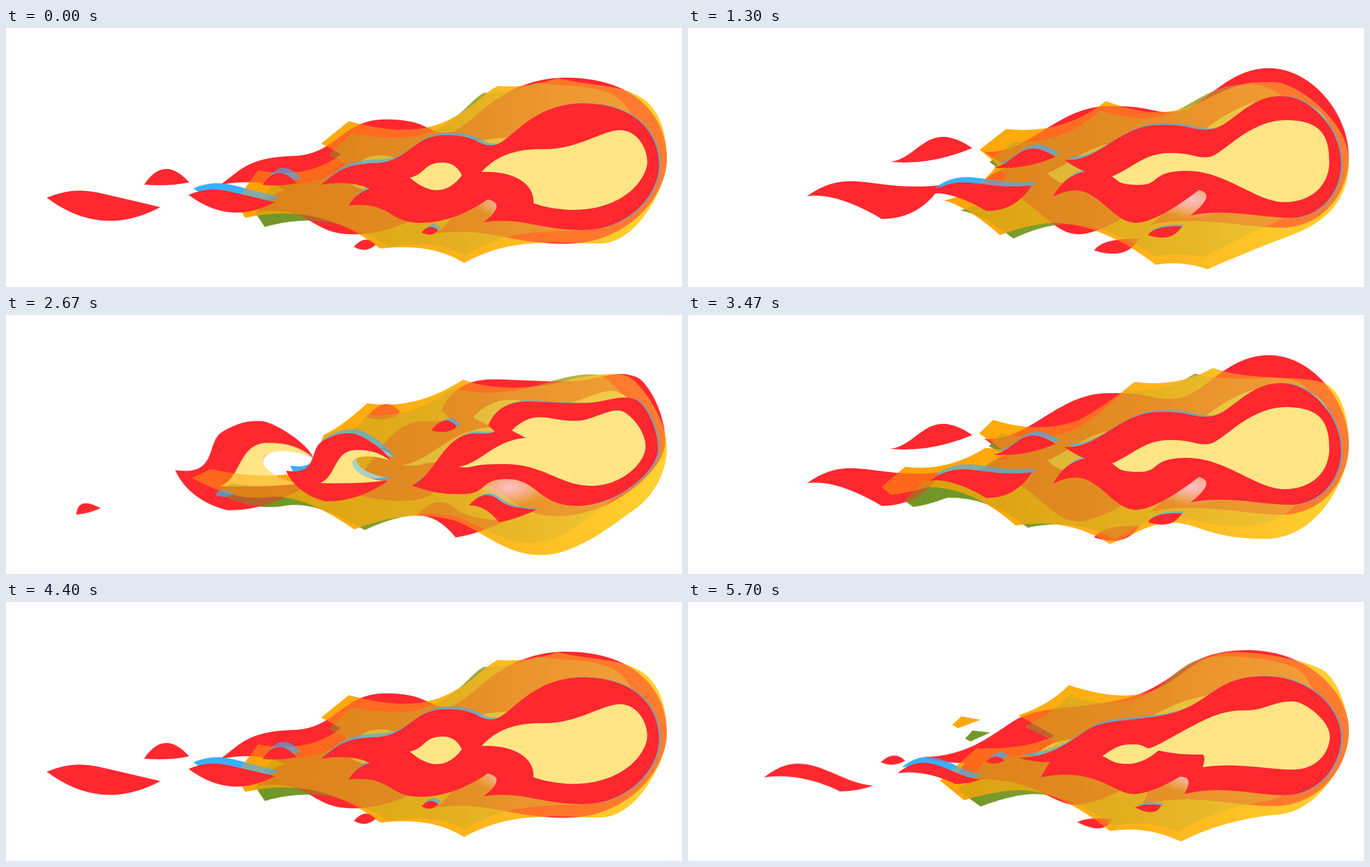
An HTML page without scripts that plays this animation: 1207 by 464 pixels, repeating every 5.73 s.

```html
<!DOCTYPE html>
<html lang="en">
<head>
<meta charset="utf-8">
<title>Fireball</title>
<style>
html, body { margin: 0; width: 100%; height: 100%; overflow: hidden; background: #fff; }
svg { display: block; width: 100%; height: 100%; }
/* Poses are stacked 1000 units apart; each layer rolls one pose every 80 ms. */
.roll { animation: roll 5.73s steps(71) infinite; }
@keyframes roll {
  0%, .35% { transform: translateY(0); }
  99.48%, 100% { transform: translateY(-71000px); }
}
.red { fill: #ff282e; --core: #ffe585; }
.blue { fill: #3aafff; --core: #3aafff; }
.core { fill: var(--core); }
.amber { fill: url(#amber); }
.olive { fill: url(#olive); }
.half { fill-opacity: .5; }
.most { fill-opacity: .63; --core: #bfeedd; }
</style>
</head>
<body>
<svg viewBox="0 0 1207 464">
<defs>
  <linearGradient id="amber" gradientUnits="userSpaceOnUse" x1="450" y1="0" x2="1180" y2="0">
    <stop offset="0" stop-color="#ffa506"/>
    <stop offset=".5" stop-color="#ffb31a"/>
    <stop offset="1" stop-color="#ffd333"/>
  </linearGradient>
  <linearGradient id="olive" gradientUnits="userSpaceOnUse" x1="450" y1="0" x2="1150" y2="0">
    <stop offset="0" stop-color="#719628"/>
    <stop offset=".5" stop-color="#8fa634"/>
    <stop offset="1" stop-color="#c8b650"/>
  </linearGradient>
  <radialGradient id="glow">
    <stop offset="0" stop-color="#ffc4d2" stop-opacity=".95"/>
    <stop offset=".45" stop-color="#ffc0c8" stop-opacity=".6"/>
    <stop offset="1" stop-color="#ffd0a0" stop-opacity="0"/>
  </radialGradient>

  <!-- Heads and parts shared by several poses -->
  <g id="forked">
    <path d="M724 306C770 285 780 213 838 212Q862 214 873 209L861 198C870 175 890 155 930 155S1030 162 1065 154S1110 146 1125 152S1164 200 1164 240S1090 342 1020 342S950 294 895 294S865 321 810 321S740 308 724 306Z"/>
    <path class="core" d="M808 272C850 265 870 225 928 220L903 207C920 190 935 183 955 183S1010 196 1040 186S1080 170 1095 171S1142 205 1142 235S1100 306 1045 306S960 267 890 267S840 276 808 272Z"/>
  </g>
  <g id="round">
    <path d="M672 236C730 242 770 176 836 174S900 186 935 181S1000 122 1058 122S1166 185 1166 242S1125 340 1075 340S960 322 897 336Q945 298 912 290S840 349 800 349S735 290 690 291Q675 291 652 302Q672 264 709 257Q690 250 672 236Z"/>
    <path class="core" d="M757 266C795 250 815 224 860 224S905 234 930 231S1000 165 1068 165S1145 200 1145 240S1115 312 1065 312S960 256 892 256S845 281 806 281S770 274 757 266Z"/>
  </g>
  <g id="long">
    <path d="M590 279C650 278 680 250 715 228S830 215 885 192S950 133 1030 133S1166 190 1166 242S1125 346 1065 346S960 327 886 344Q905 312 878 313S830 344 795 344S730 295 630 314Q636 302 646 287Q620 288 590 279Z"/>
    <path class="core" d="M740 276C760 262 770 255 793 255S812 260 822 262S905 215 945 202S1000 198 1025 190S1060 178 1080 178S1146 212 1146 240S1125 298 1085 300S980 286 919 296Q925 278 919 273Q880 275 840 266S815 290 786 290S755 282 740 276Z"/>
  </g>
  <g id="crescent">
    <path d="M500 279C560 288 540 240 565 226S600 212 616 212S680 242 687 262C650 246 620 252 619 267S650 296 682 297Q630 334 572 334S520 325 500 279Z"/>
    <path class="core" d="M561 301C590 290 585 245 622 242Q660 240 686 261C650 248 618 252 619 267S650 296 676 297Q625 303 561 301Z"/>
  </g>
  <path id="eye" class="core" d="M583 290Q608 253 655 253T730 284Q700 329 655 329L619 320Q642 305 615 305Q588 304 583 290Z"/>
  <g id="island">
    <path d="M400 318Q480 222 570 218T700 285Q640 372 570 372T400 318Z"/>
    <use href="#eye" x="-85"/>
  </g>

  <!-- Flame, 9 poses -->
  <g id="flame">
    <g>
      <path d="M562 281C590 260 600 244 660 242S725 192 785 192S840 212 870 210S935 135 1030 135S1166 190 1166 245S1110 362 1030 362S925 338 853 348Q895 315 860 307S805 349 742 349S690 310 612 318Q622 298 649 288Q615 272 562 281Z"/>
      <path d="M326 299Q360 284 395 292T480 312Q400 355 326 299Z"/>
      <path d="M458 281Q485 240 519 278Q490 284 458 281Z"/>
      <path d="M742 366Q758 348 772 363Q758 376 742 366Z"/>
      <path class="core" d="M721 268C750 262 745 241 780 241Q803 241 814 264Q775 315 721 268Z"/>
      <path class="core" d="M849 258C870 235 900 216 960 217S1065 183 1096 183S1145 215 1145 240S1110 326 1010 326Q970 324 942 314C944 275 900 255 849 258Z"/>
    </g>
    <g transform="translate(0 1000)">
      <path d="M514 286Q570 212 690 212C730 212 705 246 735 254S770 217 840 214Q808 208 778 193C880 200 920 131 1030 131S1166 190 1166 242S1110 353 1050 353S950 328 918 330S880 365 828 352Q856 322 830 314Q790 304 746 318S760 376 640 376S545 330 457 315Q490 317 548 314Q542 300 514 286Z"/>
      <path d="M277 325Q305 280 334 325Q300 324 288 354Z"/>
      <path d="M377 273Q400 270 421 267L430 277Q410 300 377 273Z"/>
      <use href="#eye"/>
      <path class="core" d="M815 268C850 260 935 245 887 206C930 205 980 200 1010 185S1085 172 1095 182S1145 212 1145 242S1120 302 1070 302S950 280 906 301Q914 294 915 282Q860 278 815 268Z"/>
    </g>
    <g transform="translate(0 2000)">
      <use href="#forked"/><use href="#island"/>
    </g>
    <g transform="translate(0 3000)">
      <use href="#round"/><use href="#island" transform="matrix(.85 0 0 .75 5 90)"/>
    </g>
    <g transform="translate(0 4000)">
      <use href="#long"/><use href="#island" transform="matrix(.67 0 0 .45 22 178)"/>
    </g>
    <g transform="translate(0 5000)">
      <use href="#forked"/><use href="#crescent" x="50"/>
    </g>
    <g transform="translate(0 6000)">
      <use href="#forked"/><use href="#crescent"/>
      <path d="M759 207Q785 175 805 200Q790 215 759 207Z"/>
      <path d="M827 341C840 325 860 315 878 330S915 345 947 349Q905 368 880 371Q855 340 827 341Z"/>
      <path d="M366 340Q368 314 399 331Q385 338 366 340Z"/>
    </g>
    <g transform="translate(0 7000)">
      <use href="#round"/>
      <path d="M432 297C490 255 520 292 614 282Q585 328 533 328S475 290 432 297Z"/>
      <path d="M545 250C585 245 595 190 656 231Q600 255 545 250Z"/>
      <path d="M821 371Q832 354 882 355Q865 385 821 371Z"/>
    </g>
    <g transform="translate(0 8000)">
      <use href="#long"/>
      <path d="M374 307C430 260 470 315 522 318Q500 326 477 326S425 298 374 307Z"/>
      <path d="M532 286Q550 269 565 284Q548 294 532 286Z"/>
      <path d="M798 368Q815 360 845 364Q835 387 798 368Z"/>
    </g>
  </g>

  <!-- Outer aura, 6 poses -->
  <path id="swell" d="M622 384Q530 320 470 326Q410 335 332 292L365 276Q480 300 545 275L567 215Q600 200 645 158Q730 172 816 116Q900 145 1010 115C1060 105 1090 103 1110 110S1180 185 1180 237S1150 330 1120 350S1020 430 955 430S850 385 800 368Q720 345 622 384Z"/>
  <g id="aura">
    <path d="M427 340L410 310L450 255Q540 272 598 226L563 207L612 167C680 185 740 190 790 165S850 118 878 104Q930 108 985 90C1050 105 1090 100 1130 122S1180 195 1180 237S1130 386 1060 386S905 372 818 421Q760 384 668 395Q560 310 427 340Z"/>
    <path transform="translate(0 1000)" d="M520 212L545 188Q630 215 700 187Q750 160 797 120Q875 130 937 95C1000 118 1090 108 1130 120S1180 190 1180 237S1130 401 1030 401S910 372 865 372S790 398 753 410Q680 362 585 377Q510 310 430 308Q390 320 362 322L345 308L388 272Q460 282 532 238L562 242Z"/>
    <use href="#swell" transform="matrix(.88 0 0 1 141 2000)"/>
    <use href="#swell" y="3000"/>
    <path transform="translate(0 4000)" d="M557 371Q500 320 457 309Q510 300 553 245L521 218L568 181Q670 192 746 131C800 150 850 165 920 130S1000 97 1045 97S1180 170 1180 237S1145 345 1080 370Q1000 400 928 432Q880 416 835 424Q740 350 650 349Q605 352 557 371Z"/>
    <path transform="translate(0 5000)" d="M493 355L450 320L515 262Q600 265 655 240L590 203Q645 185 680 149C760 175 815 175 865 140S930 90 980 90S1100 105 1130 120S1180 195 1180 237S1130 370 1060 380Q960 388 880 429Q820 400 753 410Q660 335 590 337Q550 338 493 355ZM472 220L488 205L522 211L482 226Z"/>
  </g>

  <!-- Repeat the cycles to 72 poses -->
  <g id="flame2"><use href="#flame"/><use href="#flame" y="9000"/></g>
  <g id="flame4"><use href="#flame2"/><use href="#flame2" y="18000"/></g>
  <g id="flames"><use href="#flame4"/><use href="#flame4" y="36000"/></g>
  <g id="aura3"><use href="#aura"/><use href="#aura" y="6000"/><use href="#aura" y="12000"/></g>
  <g id="aura6"><use href="#aura3"/><use href="#aura3" y="18000"/></g>
  <g id="auras"><use href="#aura6"/><use href="#aura6" y="36000"/></g>
</defs>

<!-- Solid undercoat -->
<g transform="matrix(.992 .016 -.015 1 16 -17)"><g class="roll blue"><use href="#flames"/></g></g>
<g transform="matrix(.9 -.057 .064 .908 56 72)"><g class="roll olive"><use href="#auras"/></g></g>
<g class="roll amber"><use href="#auras"/></g>

<!-- Large flame -->
<g transform="matrix(1.318 0 0 1.311 -357 -88)"><g class="roll red"><use href="#flames"/></g></g>

<!-- Translucent veils -->
<g transform="matrix(.9 -.057 .064 .908 56 72)"><g class="roll olive half"><use href="#auras"/></g></g>
<g class="roll amber half"><use href="#auras"/></g>
<ellipse cx="900" cy="308" rx="68" ry="34" fill="url(#glow)"/>
<g transform="matrix(.992 .016 -.015 1 16 -17)"><g class="roll blue most"><use href="#flames"/></g></g>

<!-- Small flame -->
<g class="roll red"><use href="#flames"/></g>
</svg>
</body>
</html>
```
